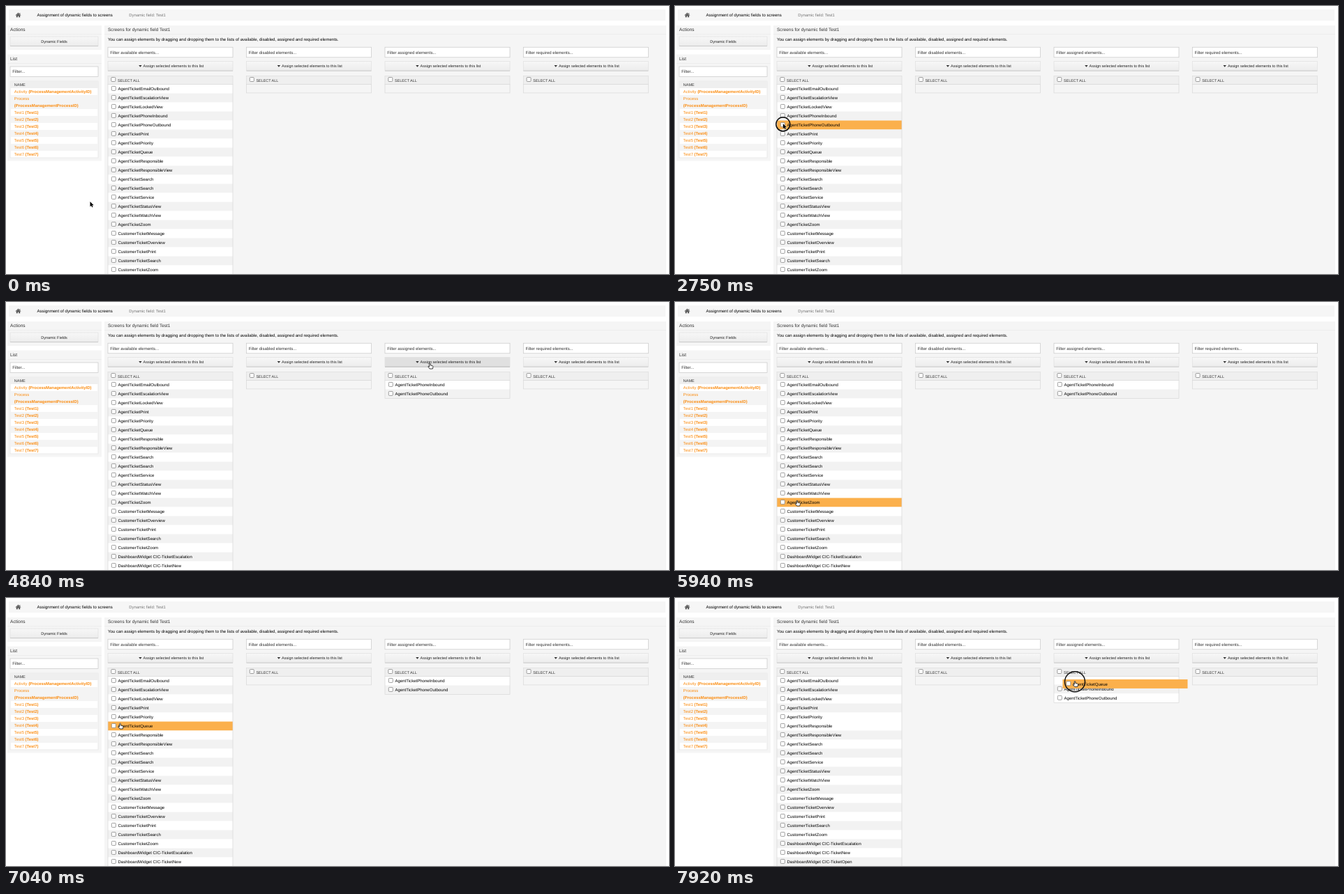
An HTML page that plays this animation: 950 px wide and 385 px high, repeating every 8 s.

```html
<!DOCTYPE html>
<html lang="en">
<head>
<meta charset="utf-8">
<title>Assignment of dynamic fields</title>
<style>
  html, body { margin: 0; width: 100%; height: 100%; overflow: hidden; background: #fff; }
  svg { display: block; width: 950px; height: 385px; }
  text { font-family: "Liberation Sans", Arial, sans-serif; text-rendering: geometricPrecision; white-space: pre; }
</style>
</head>
<body>
<svg id="stage" viewBox="0 0 950 385">
  <defs>
    <linearGradient id="btn" x1="0" y1="0" x2="0" y2="1">
      <stop offset="0" stop-color="#f7f7f7"/>
      <stop offset="1" stop-color="#ececec"/>
    </linearGradient>
  </defs>
  <g id="page"></g>
  <g id="live"></g>
</svg>
<script>
const LOOP = 8000, STEP = 110;
const ROW = 13, TOP = 112.5, GAP = 11.9, WIDTH = 179;
const ORANGE = '#fbb04c', LINK = '#fb8c10', PANEL = '#f5f5f5';
const COLS = [146, 344.5, 543, 741.3];
const KINDS = ['available', 'disabled', 'assigned', 'required'];

const agent = 'EmailOutbound EscalationView LockedView PhoneInbound PhoneOutbound Print Priority Queue Responsible ResponsibleView Search Search Service StatusView WatchView Zoom';
const customer = 'Message Overview Print Search Zoom';
const widget = 'Escalation New Open';
const prefixed = (prefix, words) => words.split(' ').map(w => prefix + w);
const ITEMS = [
  ...prefixed('AgentTicket', agent),
  ...prefixed('CustomerTicket', customer),
  ...prefixed('DashboardWidget CIC-Ticket', widget)
];
const PICKED = ['AgentTicketPhoneInbound', 'AgentTicketPhoneOutbound'];
const DRAGGED = 'AgentTicketQueue';

// Pointer hot spot: time, x, y
const PATH = [
  [0, 120.5, 281], [330, 121, 278], [1100, 146.5, 160.5], [1650, 149, 159],
  [2200, 153, 166], [2640, 154.8, 169], [2970, 154.8, 169], [3190, 154.5, 157.5],
  [3410, 154.5, 157.5], [4290, 607.5, 88], [4840, 607.5, 88], [5940, 175, 285],
  [6160, 174, 284], [7040, 163.5, 180], [7150, 163.5, 180], [7920, 573, 119.4]
];
const PRESSES = [[2640, 2970], [3190, 3410], [4290, 4510], [7150, LOOP]];
const CHECKS = { AgentTicketPhoneOutbound: 2970, AgentTicketPhoneInbound: 3410 };
const ASSIGN_AT = 4510, DRAG_AT = 7150;

const rect = (x, y, w, h, fill, stroke = 'none', more = '') =>
  `<rect x="${x}" y="${y}" width="${w}" height="${h}" fill="${fill}" stroke="${stroke}" stroke-width=".7" ${more}/>`;
const text = (x, y, size, str, fill = '#111', more = '') =>
  `<text x="${x}" y="${y}" font-size="${size}" fill="${fill}" ${more}>${str}</text>`;
const line = (x, y, w, color) => rect(x, y, w, .8, color);

function checkbox(x, y, on) {
  const box = rect(x, y, 6, 6, on ? '#3b7de0' : '#fff', on ? '#3b7de0' : '#777', 'rx="1.1"');
  return on ? box + `<path d="M${x + 1.3} ${y + 3.1}l1.3 1.4 2.2-3.1" fill="none" stroke="#fff"/>` : box;
}

function field(x, y, w, hint) {
  return rect(x, y, w, 14.6, '#fff', '#c6c6c6') + text(x + 3.2, y + 9.3, 6.02, hint, '#333');
}

function button(x, y, w, label, hot) {
  return rect(x, y, w, 13.4, hot ? '#e0e0e0' : 'url(#btn)', '#e0e0e0') +
    line(x, y + 13.2, w, hot ? '#aaa' : '#c4c4c4') +
    text(x + w / 2 + (label[0] === 'A' ? 4.5 : 0), y + 8.7, 5.5, label, '#222', 'text-anchor="middle"');
}

function assignButton(x, hot) {
  return button(x, 79.5, WIDTH, 'Assign selected elements to this list', hot) +
    `<path d="M${x + 44.2} 85h4.4l-2.2 2.7z" fill="#333"/>`;
}

function row(x, y, name, fill, on) {
  return rect(x, y, WIDTH, ROW, fill) + checkbox(x + 5.3, y + 2.9, on) +
    text(x + 14.5, y + 8.7, 6.05, name, '#000');
}

function buildPage() {
  let s = rect(4, 5, 941, 16, '#f6f6f6') +
    '<path d="M13.5 13.2l4-3.6 4 3.6-.6.6-3.4-3-3.4 3zM14.8 13.4l2.7-2.4 2.7 2.4v2.9h-2v-2h-1.4v2h-2zM19.4 10h1v1.6l-1-.9z" fill="#555"/>' +
    text(44.5, 14.9, 6.07, 'Assignment of dynamic fields to screens', '#000') +
    text(176.3, 14.9, 5.9, 'Dynamic field: Test1', '#777');

  s += rect(2, 28, 135, 35, PANEL) + text(6, 36.2, 6.6, 'Actions', '#333') +
    line(2, 40, 135, '#ebebeb') + button(6, 44, 126, 'Dynamic Fields');

  s += rect(2, 69.5, 135, 153, PANEL) + text(6, 78.4, 6.5, 'List', '#333') +
    line(2, 82, 135, '#ebebeb') + field(6, 87, 126, 'Filter...') +
    rect(6, 108, 126, 110, '#fff', '#e2e2e2') +
    rect(6, 108, 126, 10, '#efefef') + text(11.8, 115.4, 5.5, 'NAME', '#333') +
    rect(6, 128, 126, 20, '#f4f4f4');
  const link = (y, name, id) =>
    text(11.8, y, 5.92, `${name}<tspan font-weight="bold">${id}</tspan>`, LINK);
  s += link(125.1, 'Activity ', '(ProcessManagementActivityID)') +
    link(135.1, 'Process', '') + link(145.1, '', '(ProcessManagementProcessID)');
  for (let i = 1; i <= 7; i++) {
    const y = 138 + i * 10;
    if (i % 2 === 0) s += rect(6, y, 126, 10, '#f4f4f4');
    s += link(y + 7.1, `Test${i} `, `(Test${i})`);
  }

  s += rect(141, 28, 805, 357, PANEL) +
    text(146, 36.2, 6.45, 'Screens for dynamic field Test1', '#333') +
    line(141, 40, 805, '#ebebeb') +
    text(146, 50, 6.05, 'You can assign elements by dragging and dropping them to the lists of available, disabled, assigned and required elements.', '#000');

  COLS.forEach((x, i) => {
    s += field(x, 59.2, WIDTH, `Filter ${KINDS[i]} elements...`) +
      rect(x, 100.3, WIDTH, 12.2, '#efefef', '#dcdcdc') + checkbox(x + 4.8, 102.5) +
      text(x + 14, 108.5, 5.4, 'SELECT ALL', '#333');
  });
  return s;
}

function pointer(t) {
  let i = 1;
  while (i < PATH.length - 1 && t > PATH[i][0]) i++;
  const [t0, x0, y0] = PATH[i - 1], [t1, x1, y1] = PATH[i];
  const p = Math.min(1, (t - t0) / (t1 - t0)), e = p * p * (3 - 2 * p);
  return [x0 + (x1 - x0) * e, y0 + (y1 - y0) * e];
}

// Rows keep their stripe while one of them is lifted out; a gap (null) marks its slot.
function list(x, names, opt) {
  let y = TOP, s = '';
  names.forEach((name, i) => {
    if (name === null) { y += GAP; return; }
    if (name === opt.lifted) {
      if (opt.gap) y += GAP;
      return;
    }
    const over = opt.mouse && opt.mouse[0] > x + 1.5 && opt.mouse[0] < x + WIDTH &&
      opt.mouse[1] >= y && opt.mouse[1] < y + ROW;
    s += row(x, y, name, over ? ORANGE : i % 2 ? '#f2f2f2' : '#fff', opt.checked && opt.checked(name));
    if (over) opt.hit();
    y += ROW;
  });
  const h = Math.max(y - TOP, 12.4);
  return rect(x, TOP, WIDTH, h, names.length ? '#fff' : PANEL) + s +
    rect(x, TOP, WIDTH, h, 'none', '#d8d8d8');
}

function drawLive(t) {
  const [mx, my] = pointer(t);
  const moved = t >= ASSIGN_AT, drag = t > DRAG_AT;
  const [sx, sy] = pointer(DRAG_AT);
  const dx = mx - sx, dy = my - sy;
  const dropping = drag && dx > COLS[2] - COLS[0] - WIDTH / 2;
  let hand = drag, s = '';

  COLS.forEach(x => {
    const hot = !drag && mx > x && mx < x + WIDTH && my > 79.5 && my < 93;
    hand = hand || hot;
    s += assignButton(x, hot);
  });

  const hover = { mouse: drag ? null : [mx, my], hit: () => { hand = hand || mx > 160; } };
  const free = moved ? ITEMS.filter(n => !PICKED.includes(n)) : ITEMS;
  const given = moved ? PICKED : [];
  s += list(COLS[0], free, {
    ...hover, lifted: drag ? DRAGGED : '', gap: !dropping,
    checked: n => t >= CHECKS[n]
  });
  s += list(COLS[1], [], hover);
  s += list(COLS[2], dropping ? [null, ...given] : given, hover);
  s += list(COLS[3], [], hover);

  if (drag) {
    s += row(COLS[0] + dx, TOP + free.indexOf(DRAGGED) * ROW + dy, DRAGGED, ORANGE);
  }

  const press = PRESSES.find(([a, b]) => t >= a && t < b);
  if (press) {
    const r = Math.min(14.5, 5 + (t - press[0]) / 22);
    s += `<circle cx="${mx}" cy="${my + .8}" r="${r}" fill="none" stroke="#111" stroke-width="1.5"/>`;
  }
  s += `<g transform="translate(${mx} ${my})">` + (hand
    ? '<path d="M-.8 .6Q0 -.5 .8 .6V3L3.6 3.6Q4.6 4 4.4 5.4L3.8 8H-.4L-2.6 5Q-2.8 4 -1.6 4.3L-.8 5Z" fill="#fff" stroke="#111" stroke-width=".8"/>'
    : '<path d="M0 0V7.2L1.7 5.7 2.8 8.3 4 7.8 2.9 5.3H5.2Z" fill="#000" stroke="#fff" stroke-width=".6" paint-order="stroke"/>') + '</g>';
  return s;
}

const live = document.getElementById('live');
document.getElementById('page').innerHTML = buildPage();
const start = performance.now();
let shown = -1;

function tick(now) {
  const t = Math.floor((Math.max(0, now - start) % LOOP) / STEP) * STEP;
  if (t !== shown) {
    live.innerHTML = drawLive(t);
    shown = t;
  }
  requestAnimationFrame(tick);
}
tick(start);
</script>
</body>
</html>
```
